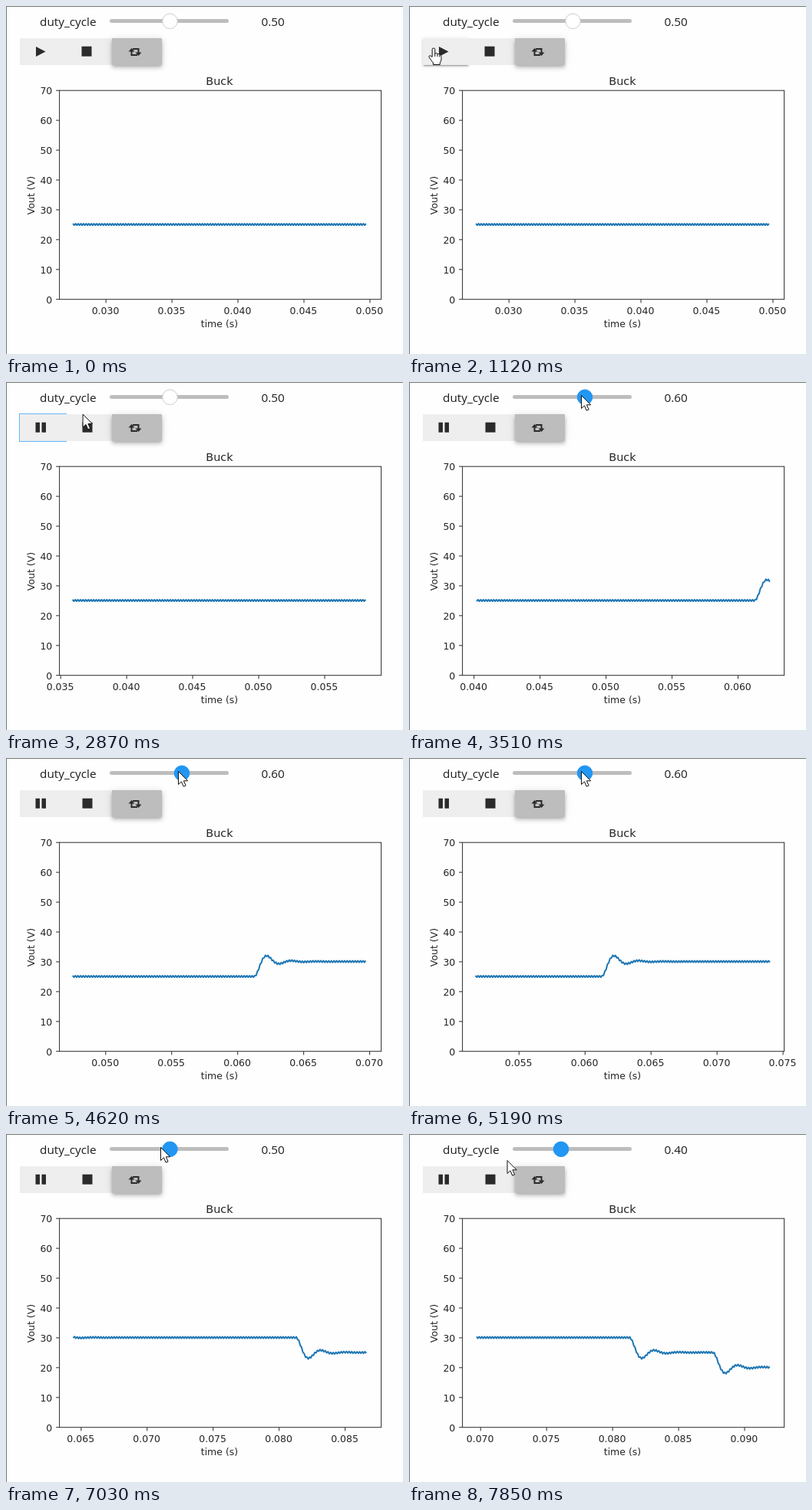
Write an HTML page that moves like this. It is 517 by 454 pixels and loops after 8000 ms.

```html
<!DOCTYPE html>
<html lang="en">
<head>
<meta charset="utf-8">
<title>Buck converter</title>
<style>
  html, body { margin: 0; width: 100%; height: 100%; overflow: hidden; background: #fefefe; }
  svg { position: absolute; left: 0; top: 0; }
  .ui { font: 15.3px "Open Sans", "Noto Sans", sans-serif; fill: #1c1c1c; }
  .plot { font: 12.5px "DejaVu Sans", sans-serif; fill: #262626; }
  .mid { text-anchor: middle; }
  .end { text-anchor: end; }
  .axis { fill: none; stroke: #2b2b2b; }
  .button { position: absolute; top: 42px; height: 35px; background: #eee; }
  #play { left: 18px; width: 60px; }
  #stop { left: 78px; width: 60px; }
  #repeat { left: 138px; width: 65px; background: #bdbdbd;
    box-shadow: 0 4px 5px rgba(0,0,0,.14), 0 1px 10px rgba(0,0,0,.12), 0 2px 4px -1px rgba(0,0,0,.2); }
  #play.hover { box-shadow: 0 2px 2px rgba(0,0,0,.14), 0 3px 1px -2px rgba(0,0,0,.2), 0 1px 5px rgba(0,0,0,.12); }
  #play.focus { box-shadow: none; outline: 1px solid #64b5f6; }
  #play.pressed { background: #bdbdbd; }
</style>
</head>
<body>
<div class="button" id="play"></div>
<div class="button" id="stop"></div>
<div class="button" id="repeat"></div>
<svg width="517" height="454" viewBox="0 0 517 454">
  <path d="M0 .5H517M.5 0V454" stroke="#777"/>
  <text class="ui end" x="117.500" y="26">duty_cycle</text>
  <rect x="135" y="17" width="155" height="5" rx="2.5" fill="#bdbdbd"/>
  <circle id="handle" cy="19.800" r="9.800"/>
  <text class="ui" id="duty" x="332.500" y="26"></text>

  <g fill="#2b2b2b">
    <path id="playIcon"/>
    <path id="stopIcon" d="M99.500 52.700h13v13h-13z"/>
    <path d="M159.500 59.500l4-4.500 4 4.500zM168.500 60.500h8l-4 4.500z"/>
    <path d="M163.500 59v5h7.500M172.500 61v-5h-7.500" fill="none" stroke="#2b2b2b" stroke-width="2"/>
  </g>

  <g class="plot">
    <text class="mid" x="278" y="103" font-size="14.500">Buck</text>
    <text class="mid" x="278" y="419">time (s)</text>
    <text class="mid" transform="translate(37 247) rotate(-90)">Vout (V)</text>
    <g id="yAxis"></g>
    <g id="xAxis"></g>
  </g>
  <path id="wave" fill="none" stroke="#1f77b4" stroke-width="2" stroke-linejoin="round"/>
  <rect class="axis" x="69.600" y="110.200" width="419" height="272.500"/>

  <g fill="#fff" stroke="#111" stroke-linejoin="round">
    <path id="arrow" d="M.5 .5V17.500l4-3.600 2.700 6.300 2.900-1.200-2.700-6.200h5.300z"/>
    <path id="hand" d="M-1.800 11.500V1.500Q-1.800 0 0 0T1.800 1.500V7Q4.200 5.800 5 7.500 7.200 6.700 7.800 8.600 10 8 10 10.500V15Q10 17 8.300 19V21.500H-.5V19Q-2.500 17-4 14.500L-6 11.800Q-6.300 9.500-4.200 9.700ZM1.800 7V11M5 7.500V11M7.800 8.600V11.500"/>
  </g>
</svg>
<script>
const LOOP = 8000, REFRESH = 138, PRESS_TIME = 1440, LAST_REFRESH = 46;
const START = 27.56, WINDOW = 22.105, STEP = 1.0537;   // simulated ms
const SCALE_X = 380 / WINDOW, SCALE_Y = 272.5 / 70;
const byId = id => document.getElementById(id);
const plotY = volts => 382.7 - volts * SCALE_Y;

// Refreshes are counted from the press on the play button: [refresh, x, y].
const cursorPath = [[-7, 481, 164], [-3, 32, 55], [8, 32, 55], [13, 224, 17],
  [33, 224, 17], [36, 201, 17], [40, 201, 17], [LAST_REFRESH, 127.5, 34]];

// The slider moves when the right edge of the window reaches these times.
const voltageSteps = [[11, 5], [30, -5], [36, -5]]
  .map(([step, change]) => ({ at: START + WINDOW + STEP * step, change }));

// 25 of every 28 refreshes bring new data.
const dataStep = refresh => Math.max(0, Math.floor((25 * refresh - 16) / 28));

function cursorAt(refresh) {
  const next = cursorPath.findIndex(point => point[0] > refresh);
  if (next < 0) return cursorPath.at(-1).slice(1);
  const [r0, x0, y0] = cursorPath[next - 1], [r1, x1, y1] = cursorPath[next];
  const p = (refresh - r0) / (r1 - r0), eased = p * p * (3 - 2 * p);
  return [x0 + (x1 - x0) * eased, y0 + (y1 - y0) * eased];
}

// Damped second-order step response.
function response(t) {
  if (t <= 0) return 0;
  const damping = 1.02, omega = 3.37;
  return 1 - Math.exp(-damping * t) * (Math.cos(omega * t) + damping / omega * Math.sin(omega * t));
}

function voltage(sample) {
  const ripple = sample % 2 ? 0.27 : -0.27;
  return voltageSteps.reduce((sum, { at, change }) => sum + change * response(sample / 10 - at), 25.1 + ripple);
}

function drawPlot(left) {
  const plotX = time => 88.2 + (time - left) * SCALE_X;
  const points = [];
  for (let n = Math.floor(left * 10); n <= Math.ceil((left + WINDOW) * 10); n++)
    points.push(`${plotX(n / 10).toFixed(2)} ${plotY(voltage(n)).toFixed(2)}`);
  byId("wave").setAttribute("d", "M" + points.join("L"));

  let ticks = "";
  for (let time = Math.ceil(left / 5 - 1) * 5; plotX(time) < 488.5; time += 5) {
    const x = plotX(time);
    if (x < 69.5) continue;
    ticks += `<path class="axis" d="M${x} 383v4.400"/>
      <text class="mid" x="${x - .6}" y="402">${(time / 1000).toFixed(3)}</text>`;
  }
  byId("xAxis").innerHTML = ticks;
}

function place(id, shown, x, y) {
  byId(id).setAttribute("visibility", shown ? "visible" : "hidden");
  byId(id).setAttribute("transform", `translate(${x} ${y})`);
}

function draw(refresh) {
  const entered = refresh >= -7, playing = refresh >= 1, dragging = refresh >= 12;
  const [x, y] = entered ? cursorAt(refresh) : [0, 0];
  const overButtons = x > 18 && x < 203 && y > 42 && y < 77;
  place("arrow", entered && !overButtons, x, y);
  place("hand", overButtons, x, y);

  const classes = byId("play").classList;
  classes.toggle("hover", overButtons && x < 78);
  classes.toggle("pressed", refresh === 0);
  classes.toggle("focus", playing && !dragging);
  byId("playIcon").setAttribute("d", playing
    ? "M38.500 52.700h5.500v13h-5.500zM46.500 52.700h5.500v13h-5.500z"
    : "M39 53l12.500 6.500-12.500 6.500z");
  byId("stopIcon").setAttribute("transform", `translate(${playing ? 0 : -1} 0)`);

  const left = START + STEP * dataStep(refresh);
  const target = voltageSteps.reduce((sum, { at, change }) => left + WINDOW > at - .01 ? sum + change : sum, 25);
  const duty = target / 50;
  const handle = byId("handle");
  handle.setAttribute("cx", 136 + 155 * duty);
  handle.setAttribute("fill", dragging ? "#2196f3" : "#fff");
  handle.setAttribute("stroke", dragging ? "#2196f3" : "#ccc");
  byId("duty").textContent = duty.toFixed(2);
  drawPlot(left);
}

for (let volts = 0; volts <= 70; volts += 10) {
  const y = plotY(volts);
  byId("yAxis").innerHTML += `<path class="axis" d="M69.500 ${y}h-4.400"/>
    <text class="end" x="60.300" y="${y + 4.8}">${volts}</text>`;
}

const origin = performance.now();
let shown;
function tick() {
  const t = (performance.now() - origin) % LOOP;
  const refresh = Math.min(LAST_REFRESH, Math.floor((t - PRESS_TIME) / REFRESH));
  if (refresh !== shown) draw(shown = refresh);
  requestAnimationFrame(tick);
}
tick();
</script>
</body>
</html>
```
